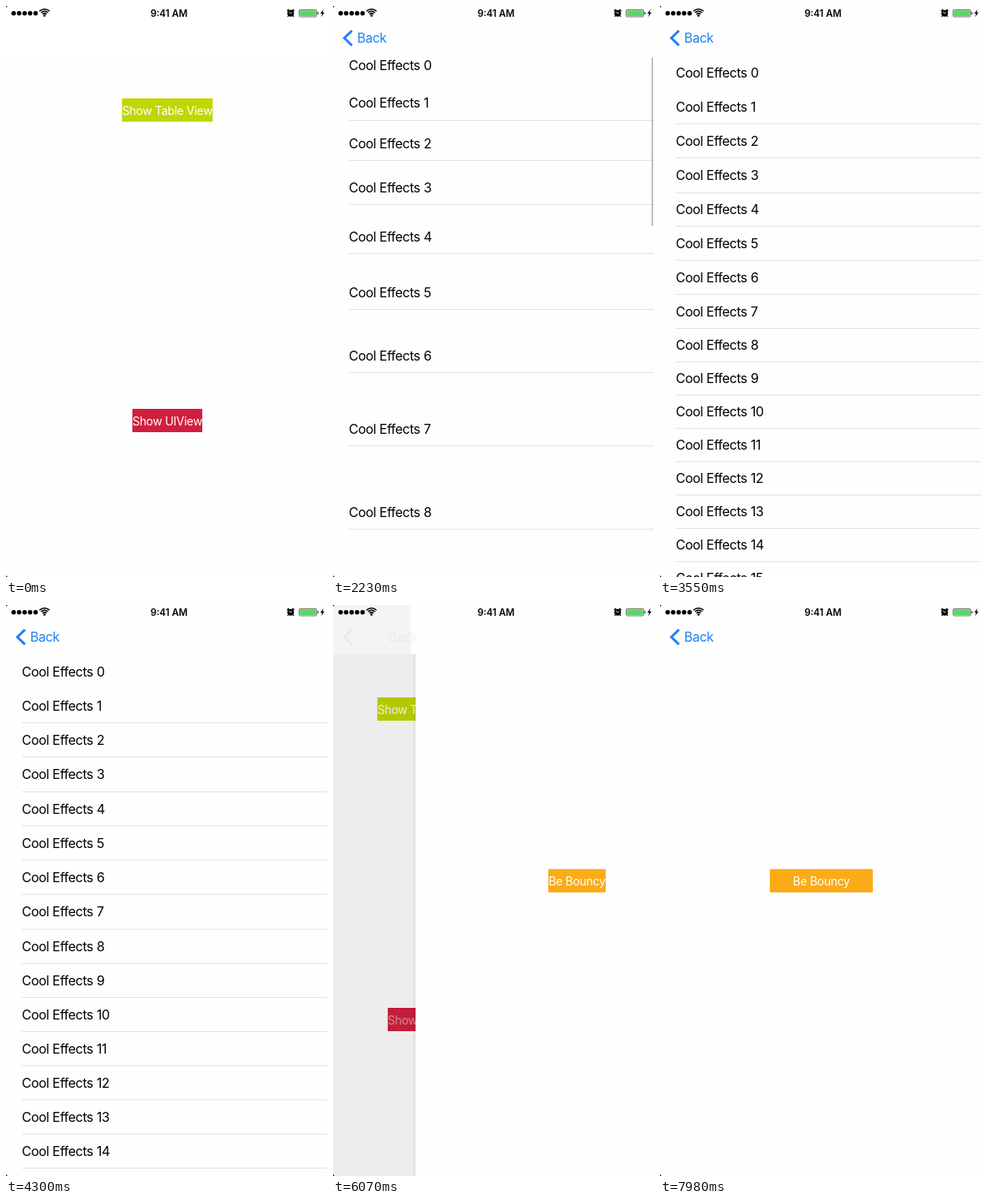
Write an HTML page with a canvas that moves like this. It is 386 by 686 pixels and loops after 8000 ms.

```html
<!DOCTYPE html>
<html lang="en">
<head>
<meta charset="utf-8">
<title>Navigation and spring effects</title>
<style>
  html, body { margin: 0; width: 100%; height: 100%; overflow: hidden; background: #fefefe; }
  canvas { display: block; width: 386px; height: 686px; }
</style>
</head>
<body>
<canvas id="stage"></canvas>
<script>
const W = 386, H = 686, LOOP = 8000;
const FRAME = 147.5, FRAME_START = 8, FRAME_TIME = 15;   // the screen refreshes in coarse steps
const PUSH_TABLE = 1052, POP_TABLE = 4941, PUSH_BOUNCY = 5906, BOUNCE = 7099;
const WHITE = '#fefefe', BLUE = '#1e82f2';
const FONT = 'Inter, "Open Sans", sans-serif';

const canvas = document.getElementById('stage');
const ctx = canvas.getContext('2d');
const ratio = window.devicePixelRatio || 1;
canvas.width = W * ratio;
canvas.height = H * ratio;

const clamp = v => Math.max(0, Math.min(1, v));

// Critically damped slide from 0 to 1.
function glide(ms) {
  const x = Math.max(0, ms) * 0.01695;
  return 1 - (1 + x) * Math.exp(-x);
}

// Remaining share of the distance for an underdamped spring.
function spring(ms, omega, damping) {
  const x = Math.max(0, ms) * omega;
  const root = Math.sqrt(1 - damping * damping);
  return Math.exp(-damping * x) * (Math.cos(root * x) + damping / root * Math.sin(root * x));
}

// Title opacity of a button held from down to up.
function pressed(t, down, up) {
  if (t < down) return 1;
  return t < up ? 0.2 : clamp(0.2 + 0.8 * (t - up) / 400);
}

function rect(x, y, w, h, color) {
  ctx.fillStyle = color;
  ctx.fillRect(x, y, w, h);
}

function text(str, x, y, { size = 15.84, color = '#000', align = 'left', weight = 400, spacing = -0.4 } = {}) {
  ctx.font = `${weight} ${size}px ${FONT}`;
  ctx.letterSpacing = spacing + 'px';
  ctx.textAlign = align;
  ctx.textBaseline = 'alphabetic';
  ctx.fillStyle = color;
  ctx.fillText(str, x, y + size * 0.364);
}

function line(points, color, width) {
  ctx.beginPath();
  points.forEach(([x, y]) => ctx.lineTo(x, y));
  ctx.strokeStyle = color;
  ctx.lineWidth = width;
  ctx.stroke();
}

function disc(x, y, r, color = '#000') {
  ctx.beginPath();
  ctx.arc(x, y, r, 0, 7);
  ctx.fillStyle = color;
  ctx.fill();
}

function button(label, center, y, width, color, alpha) {
  rect(center - width / 2, y, width, 28, color);
  text(label, center, y + 14.5,
    { size: 14, color: `rgba(255,255,255,${alpha})`, align: 'center', spacing: -0.3 });
}

function drawHome(t, progress) {
  rect(0, 0, W, H, WHITE);
  const x = -116 * progress;
  button('Show Table View', 194 + x, 111, 109, '#c0d703', pressed(t, 890, PUSH_TABLE));
  button('Show UIView', 194 + x, 484, 84, '#d01f3e', pressed(t, 5610, PUSH_BOUNCY));
  rect(0, 0, W, H, `rgba(0,0,0,${0.09 * progress})`);
  rect(0, 0, W, 59, 'rgba(255,255,255,0.35)');
}

function drawTable(t) {
  for (let i = 0; i < 17; i++) {
    const y = 80 + 41.2 * i + H * spring(t - 1080 - 79 * i, 0.004105, 0.8);
    if (y > H + 30) continue;
    text('Cool Effects ' + i, 19, y);
    if (i) rect(19, Math.round(y + 20), W - 19, 1, '#e2e2e4');
  }
  const bar = Math.min(clamp((t - 1850) / 200), clamp((3400 - t) / 400));
  rect(383, 62, 2, 202, `rgba(0,0,0,${0.25 * bar})`);
}

function drawBouncy(t) {
  const width = 69 + 56 * (1 - spring(t - BOUNCE, 0.0221, 0.2));
  button('Be Bouncy', 194, 317.3, width, '#faab17', pressed(t, 6940, BOUNCE));
}

function drawPushed(content, t, progress) {
  const x = W * (1 - progress);
  const shade = ctx.createLinearGradient(x - 4, 0, x, 0);
  shade.addColorStop(0, 'rgba(0,0,0,0)');
  shade.addColorStop(1, 'rgba(0,0,0,0.07)');
  rect(x - 4, 59, 4, H - 59, shade);
  rect(x - 6, 0, W, 59, WHITE);
  rect(x, 0, W, H, WHITE);
  ctx.save();
  ctx.translate(x, 0);
  content(t);
  ctx.restore();
}

function drawBack(x, textAlpha, arrowAlpha) {
  ctx.globalAlpha = textAlpha;
  text('Back', x, 38.5, { color: BLUE });
  ctx.globalAlpha = arrowAlpha;
  line([[22.8, 29.6], [13.6, 38.5], [22.8, 47.4]], BLUE, 2.9);
  ctx.globalAlpha = 1;
}

function drawStatusBar() {
  for (let i = 0; i < 5; i++) disc(9.2 + 6.6 * i, 8.8, 2.7);

  for (const r of [3.4, 6, 8.6]) {
    ctx.beginPath();
    ctx.arc(46.3, 12.3, r, -Math.PI * 0.75, -Math.PI * 0.25);
    ctx.strokeStyle = '#000';
    ctx.lineWidth = 1.6;
    ctx.stroke();
  }
  disc(46.3, 11.6, 1.3);

  text('9:41 AM', 196, 9, { size: 11.4, align: 'center', weight: 600, spacing: 0 });

  disc(342.3, 8.7, 4);
  line([[338, 6], [340.3, 4]], '#000', 1.4);
  line([[344.3, 4], [346.6, 6]], '#000', 1.4);
  line([[339.6, 11.5], [338.6, 13]], '#000', 1.2);
  line([[345, 11.5], [346, 13]], '#000', 1.2);
  line([[340.4, 7], [342.3, 9], [344, 7.8]], '#fff', 0.9);

  ctx.strokeStyle = '#555';
  ctx.lineWidth = 0.8;
  ctx.beginPath();
  ctx.roundRect(352.4, 4.4, 21.2, 8.6, 1.5);
  ctx.stroke();
  rect(353.2, 5.2, 19.6, 7, '#5cd665');
  rect(374.4, 7.2, 1.2, 3, '#333');

  ctx.fillStyle = '#000';
  ctx.beginPath();
  [[381.6, 4], [378, 9.2], [380.2, 9.2], [379, 13.2], [383, 7.8], [380.8, 7.8]]
    .forEach(([x, y]) => ctx.lineTo(x, y));
  ctx.fill();
}

function drawCorners() {
  ctx.fillStyle = '#222';
  for (const [y, dir] of [[0, 1], [H, -1]]) {
    ctx.beginPath();
    ctx.moveTo(0, y);
    ctx.lineTo(2, y);
    ctx.lineTo(0, y + 2 * dir);
    ctx.fill();
  }
}

function draw(t) {
  const popping = t >= POP_TABLE && t < PUSH_BOUNCY;
  const start = t < POP_TABLE ? PUSH_TABLE : popping ? POP_TABLE : PUSH_BOUNCY;
  const slide = glide(t - start);
  const progress = popping ? 1 - slide : slide;

  drawHome(t, progress);
  if (progress > 0.0005) drawPushed(t < PUSH_BOUNCY ? drawTable : drawBouncy, t, progress);

  if (popping) {
    const alpha = clamp(1 - (t - start) / 260);
    drawBack(29 + 128 * slide, alpha, alpha * alpha);
  } else {
    const held = t > 4780 && t < POP_TABLE ? 0.4 : 1;
    const alpha = held * clamp((t - start - 140) / 220);
    drawBack(29 + 146 * (1 - slide), alpha, alpha);
  }
  drawStatusBar();
  drawCorners();
}

function tick(now) {
  const step = Math.floor((now % LOOP - FRAME_START) / FRAME);
  ctx.setTransform(ratio, 0, 0, ratio, 0, 0);
  draw(Math.max(0, step * FRAME + FRAME_TIME));
  requestAnimationFrame(tick);
}
requestAnimationFrame(tick);
</script>
</body>
</html>
```
